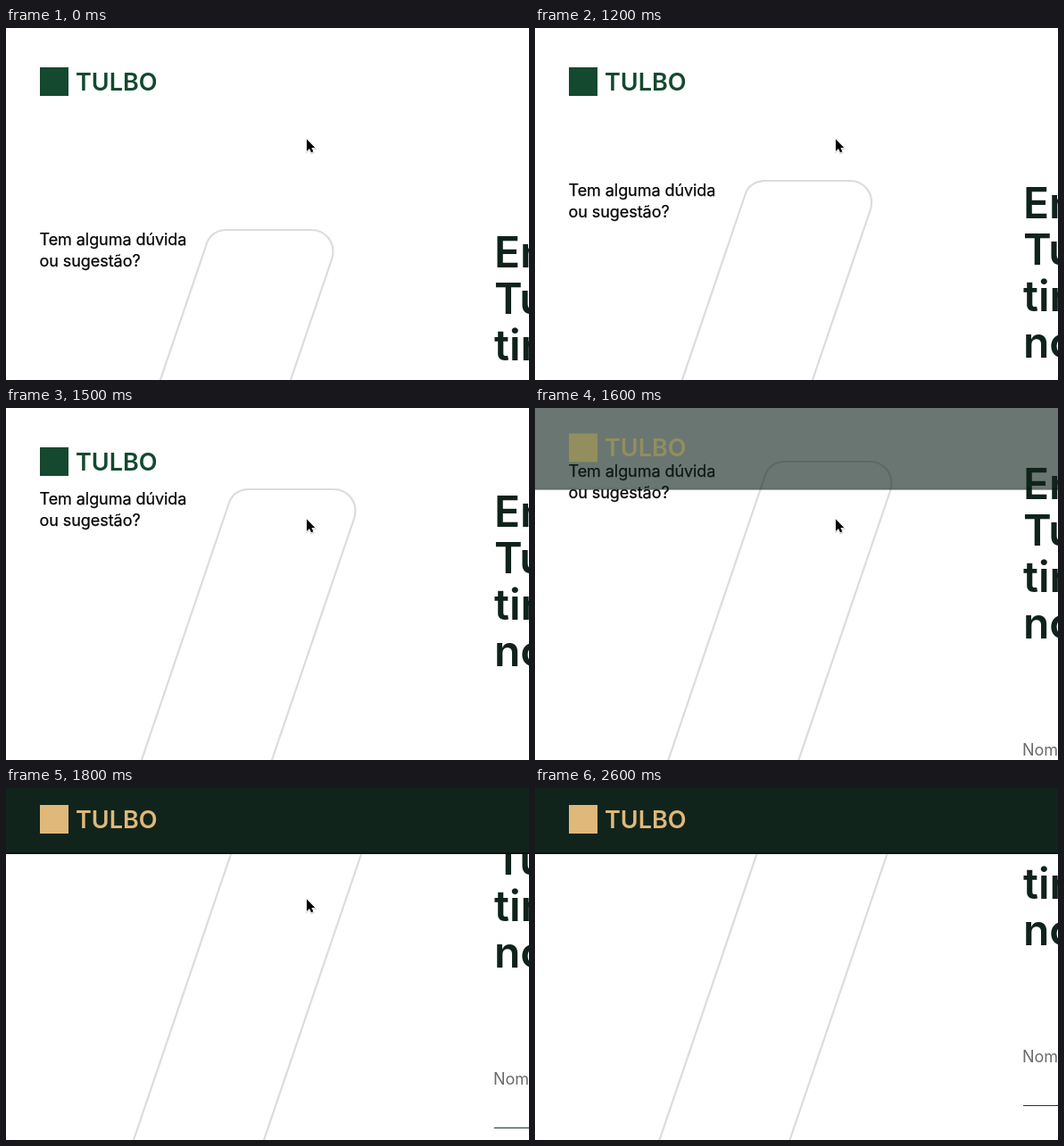
An HTML page for the animation above (2800 ms loop, 586x394 px).

```html
<!DOCTYPE html>
<html lang="pt">
<head>
<meta charset="utf-8">
<title>Contato</title>
<style>
  html, body { margin: 0; width: 100%; height: 100%; overflow: hidden; background: #fff; }
  svg { display: block; width: 586px; height: 394px; }
  text { font-family: Inter, sans-serif; }
  .intro { font-size: 18px; letter-spacing: -.06px; fill: #050505; stroke: #050505; stroke-width: .25px; }
  .title { font-size: 48px; font-weight: 600; fill: #0f231b; }
  .label { font-size: 18px; letter-spacing: -.06px; fill: #6b6b6b; }
  .brand { font-size: 27px; font-weight: 600; }
</style>
</head>
<body>
<svg viewBox="0 0 586 394">
  <g id="page">
    <path id="shape" fill="none" stroke="#dcdcdc" stroke-width="2.2"
      d="M84.4 654L225 241C228 232 236 226 247 226H342C358 226 370 240 365.3 258L230.4 654"/>
    <g class="intro">
      <text x="37.5" y="243">Tem alguma dúvida</text>
      <text x="37.5" y="267">ou sugestão?</text>
    </g>
    <g class="title">
      <text x="547" y="268">Entre</text>
      <text x="547" y="320">Tulbo</text>
      <text x="547" y="372">tire</text>
      <text x="547" y="424">nossas</text>
    </g>
    <text class="label" x="546" y="555">Nome</text>
    <rect x="547" y="603" width="39" height="1" fill="#20352b"/>
  </g>
  <g id="bar">
    <rect id="fill" width="586" fill="#11241c"/>
    <rect id="edge" width="586" height="2" fill="#08150f"/>
  </g>
  <g id="logo">
    <rect x="38" width="32" height="32"/>
    <text class="brand" x="78" y="26">TULBO</text>
  </g>
  <g id="cursor">
    <g transform="translate(337 124.5) scale(.88)">
      <path d="M0 1V16L3.5 13L5.8 18L8.5 16.8L6.3 12H10.5Z" stroke="#000" stroke-width="2" opacity=".18"/>
      <path d="M0 0V15L3.5 11.9L5.7 16.7L8.3 15.5L6.1 10.8H10.5Z" stroke="#fff" stroke-width="1.4" paint-order="stroke"/>
    </g>
  </g>
</svg>
<script>
  const LOOP = 2800, STEP = 100;
  // Page scroll and sideways drift of the outline, one value per step from 1000 ms
  const scroll = [7, 29, 55, 82, 108, 135, 166, 197, 223, 240, 248];
  const drift = [1, 5.6, 10.7, 15, 20, 25, 33, 41, 46, 49.5, 51];
  const green = [20, 73, 47], gold = [223, 184, 122];

  const $ = id => document.getElementById(id);
  const [page, shape, bar, fill, edge, logo, cursor] =
    ['page', 'shape', 'bar', 'fill', 'edge', 'logo', 'cursor'].map($);
  const move = (el, x, y) => el.setAttribute('transform', `translate(${x} ${y})`);
  const mix = (a, b, p) => a + (b - a) * p;
  const at = (list, i) => i < 0 ? 0 : list[Math.min(i, list.length - 1)];

  function draw(time) {
    const step = Math.floor(time % LOOP / STEP);

    move(page, 0, -at(scroll, step - 10));
    move(shape, at(drift, step - 10), 0);

    // The bar shrinks and darkens over 300 ms
    const t = Math.min(Math.max((step - 15) / 3, 0), 1);
    const p = 1 - (1 - t) ** 2.4;
    const height = mix(120, 74, p);
    bar.setAttribute('opacity', p);
    fill.setAttribute('height', height);
    edge.setAttribute('y', height - 2);
    move(logo, 0, mix(44, 19, p));
    logo.setAttribute('fill', `rgb(${green.map((c, i) => Math.round(mix(c, gold[i], p)))})`);

    // The pointer speeds up and leaves at the bottom
    const u = Math.max(step - 22, 0) ** 2;
    move(cursor, -2.2 * u, 25 * u);
  }

  const start = performance.now();
  function tick() {
    draw(performance.now() - start);
    requestAnimationFrame(tick);
  }
  tick();
</script>
</body>
</html>
```
